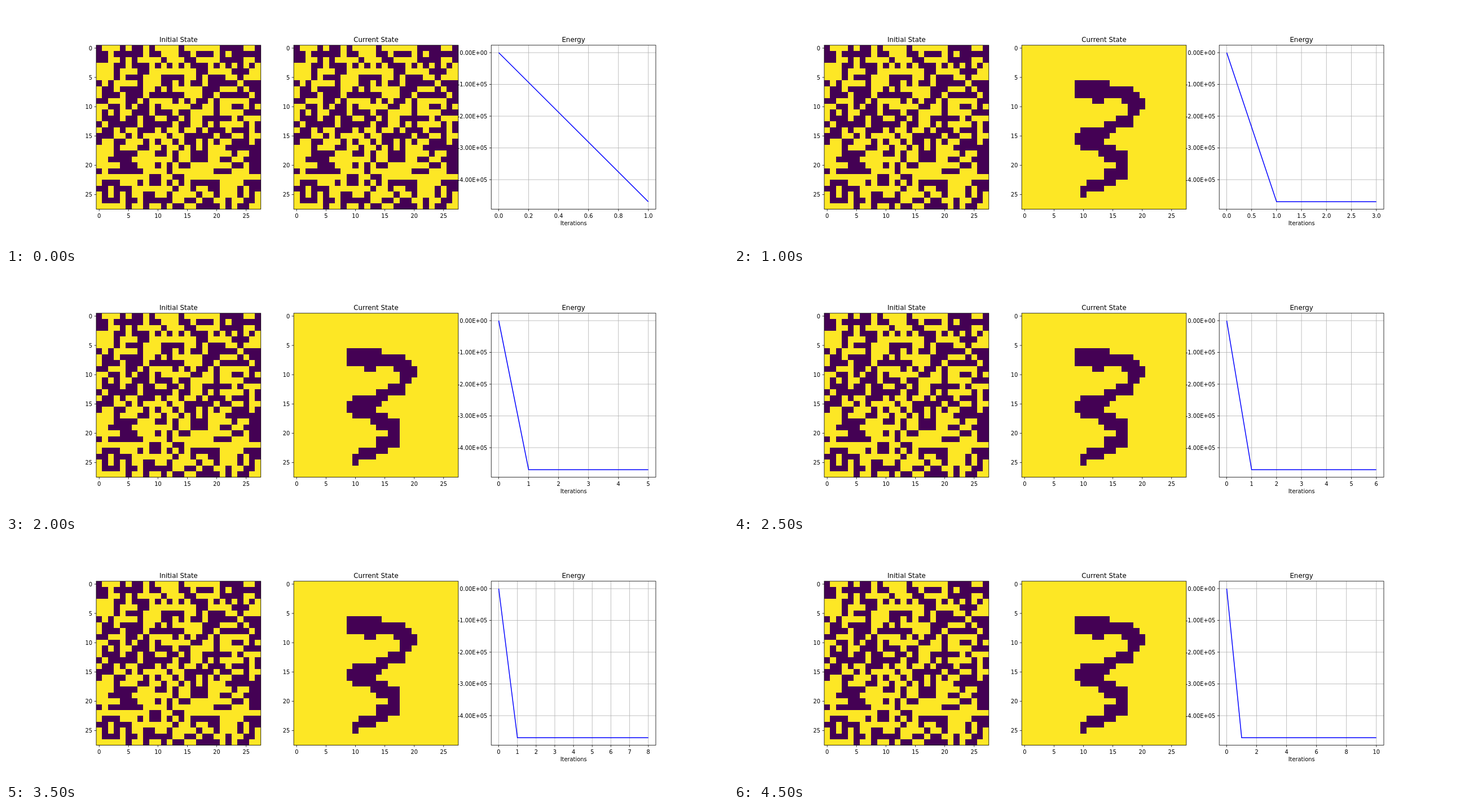
An HTML page with a canvas for the animation above (5 s loop, 1280x427 px).

```html
<!DOCTYPE html>
<html lang="en">
<head>
<meta charset="utf-8">
<title>Energy descent</title>
<style>
  html, body { margin: 0; width: 100%; height: 100%; overflow: hidden; background: #fff; }
  canvas { display: block; }
</style>
</head>
<body>
<canvas id="stage" width="1280" height="427"></canvas>
<script>
const ctx = document.getElementById('stage').getContext('2d');
const PT = 1280 / 1296;              // one typographic point in pixels
const SIZE = 291.76, TOP = 69.75, BOTTOM = TOP + SIZE;
const LEFTS = [160, 510.12, 860.24];
const CELLS = 28, CELL = SIZE / CELLS;
const STEP_MS = 500, STEPS = 10;
const FINAL_ENERGY = -4.695;         // in units of 1e5
const MARGIN = SIZE / 22, SPAN = SIZE - 2 * MARGIN;

const digit = new Path2D('M9 6H15V7H19V8H20V9H21V11H20V12H19V14H16V15H15V16H14V17H16V18H18' +
  'V23H16V24H14V25H11V26H10V24H11V23H14V21H16V20H14V19H13V18H10V17H9V15H10V14H14V13H16V12H18' +
  'V10H17V9H14V10H12V9H9Z');

let seed = 28;
function random() {
  seed = (seed * 1664525 + 1013904223) % 4294967296;
  return seed / 4294967296;
}

const makeGrid = isDark => Array.from({ length: CELLS }, (_, row) =>
  Array.from({ length: CELLS }, (_, col) => isDark(col, row)));
const noise = makeGrid(() => random() < 0.47);
const recalled = makeGrid((col, row) => ctx.isPointInPath(digit, col + 0.5, row + 0.5));

function text(str, x, y, align = 'center', points = 10) {
  ctx.font = `${points * PT}px "DejaVu Sans", sans-serif`;
  ctx.textAlign = align;
  ctx.fillStyle = '#000';
  ctx.fillText(str, x, y);
}

function line(points, color, width) {
  ctx.beginPath();
  points.forEach(([x, y]) => ctx.lineTo(x, y));
  ctx.strokeStyle = color;
  ctx.lineWidth = width * PT;
  ctx.stroke();
}

function xTick(x, label) {
  line([[x, BOTTOM], [x, BOTTOM + 3.5 * PT]], '#000', 0.8);
  text(label, x, 376.5);
}

function yTick(left, y, label) {
  line([[left - 3.5 * PT, y], [left, y]], '#000', 0.8);
  text(label, left - 7 * PT, y + 3.6, 'right');
}

function frame(left, title) {
  ctx.strokeStyle = '#000';
  ctx.lineWidth = 0.8 * PT;
  ctx.strokeRect(left, TOP, SIZE, SIZE);
  text(title, left + SIZE / 2, 64, 'center', 12);
}

function drawState(left, title, grid) {
  const px = i => Math.round(left + i * CELL);
  const py = i => Math.round(TOP + i * CELL);
  grid.forEach((cells, row) => cells.forEach((dark, col) => {
    ctx.fillStyle = dark ? '#440154' : '#fde725';
    ctx.fillRect(px(col), py(row), px(col + 1) - px(col), py(row + 1) - py(row));
  }));
  for (let i = 0; i < CELLS; i += 5) {
    const offset = (i + 0.5) * CELL;
    xTick(left + offset, i);
    yTick(left, TOP + offset, i);
  }
  frame(left, title);
}

function drawEnergy(n) {
  const left = LEFTS[2];
  const px = i => left + MARGIN + SPAN * i / n;
  const py = e => TOP + MARGIN + SPAN * e / FINAL_ENERGY;
  const step = [0.2, 0.25, 0.5, 1, 2].find(s => s >= n * 1.1 / 9);
  const decimals = step === 0.25 ? 2 : step < 1 ? 1 : 0;

  for (let i = 0; i * step <= n; i++) {
    const x = px(i * step);
    line([[x, TOP], [x, BOTTOM]], '#b0b0b0', 0.8);
    xTick(x, (i * step).toFixed(decimals));
  }
  for (let e = 0; e <= 4; e++) {
    const y = py(-e);
    line([[left, y], [left + SIZE, y]], '#b0b0b0', 0.8);
    yTick(left, y, e ? `-${e}.00E+05` : '0.00E+00');
  }
  line([[px(0), py(0)], [px(1), py(FINAL_ENERGY)], [px(n), py(FINAL_ENERGY)]], '#00f', 1.5);
  frame(left, 'Energy');
  text('Iterations', left + SIZE / 2, 390.2);
}

function draw(time) {
  const n = Math.floor(time / STEP_MS) % STEPS + 1;
  ctx.fillStyle = '#fff';
  ctx.fillRect(0, 0, 1280, 427);
  drawState(LEFTS[0], 'Initial State', noise);
  drawState(LEFTS[1], 'Current State', n === 1 ? noise : recalled);
  drawEnergy(n);
  requestAnimationFrame(draw);
}
requestAnimationFrame(draw);
</script>
</body>
</html>
```
